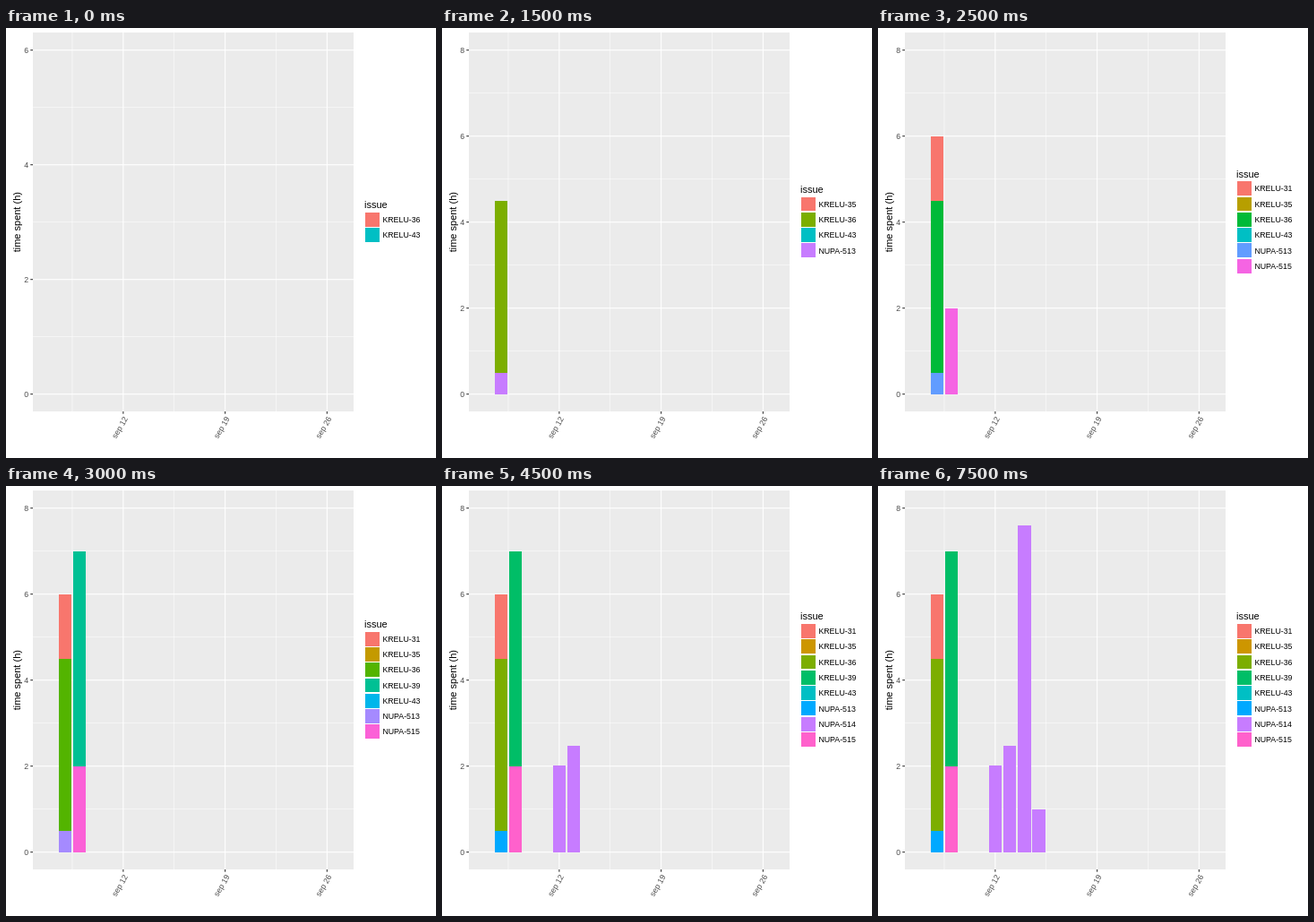
An HTML page with a canvas that plays this animation: 480 by 480 pixels, repeating every 8 s.

```html
<!DOCTYPE html>
<html lang="en">
<head>
<meta charset="utf-8">
<title>Time spent per issue</title>
<style>
html, body { margin: 0; width: 100%; height: 100%; overflow: hidden; background: #fff; }
canvas { display: block; }
</style>
</head>
<body>
<canvas id="chart" width="480" height="480"></canvas>
<script>
const ctx = document.getElementById('chart').getContext('2d');
const FONT = '"Liberation Sans", Arial, sans-serif';
const STEP = 500, STEPS = 16;

const panel = { left: 30, right: 388, top: 5, bottom: 428 };
const zeroY = 408.68, topY = 24.68;
const dayWidth = 16.25, firstDayX = 65.85;
const dayX = day => firstDayX + day * dayWidth;

// Issue name and the step at which it joins the legend
const issues = [
  ['KRELU-31', 4], ['KRELU-35', 1], ['KRELU-36', 0], ['KRELU-39', 6],
  ['KRELU-43', 0], ['NUPA-513', 2], ['NUPA-514', 7], ['NUPA-515', 5]
];

// Step, day, issue index, hours at the bottom, hours at the top
const logs = [
  [2, 0, 5, 0, 0.5], [3, 0, 2, 0.5, 4.5], [4, 0, 0, 4.5, 6],
  [5, 1, 7, 0, 2], [6, 1, 3, 2, 7],
  [7, 4, 6, 0, 0.58], [8, 4, 6, 0, 2.02], [9, 5, 6, 0, 2.47],
  [10, 6, 6, 0, 2.99], [11, 6, 6, 0, 4.41], [12, 6, 6, 0, 6.24],
  [13, 6, 6, 0, 7], [14, 6, 6, 0, 7.6], [15, 7, 6, 0, 1]
];

// Evenly spaced hues for each legend size
const palettes = {
  2: 'F8766D 00BFC4',
  3: 'F8766D 00BA38 619CFF',
  4: 'F8766D 7CAE00 00BFC4 C77CFF',
  5: 'F8766D A3A500 00BF7D 00B0F6 E76BF3',
  6: 'F8766D B79F00 00BA38 00BFC4 619CFF F564E3',
  7: 'F8766D C49A00 53B400 00C094 00B6EB A58AFF FB61D7',
  8: 'F8766D CD9600 7CAE00 00BE67 00BFC4 00A9FF C77CFF FF61CC'
};

function box(x1, y1, x2, y2, color) {
  ctx.fillStyle = color;
  ctx.fillRect(x1, y1, x2 - x1, y2 - y1);
}

function crispBox(x1, y1, x2, y2, color) {
  box(...[x1, y1, x2, y2].map(Math.round), color);
}

function hLine(y, x1, x2, width, color) {
  box(x1, y - width / 2, x2, y + width / 2, color);
}

function vLine(x, y1, y2, width, color) {
  box(x - width / 2, y1, x + width / 2, y2, color);
}

function label(text, x, y, size, color, align = 'left', angle = 0) {
  ctx.save();
  ctx.translate(x, y);
  ctx.rotate(angle * Math.PI / 180);
  ctx.font = `${size}px ${FONT}`;
  ctx.textAlign = align;
  ctx.fillStyle = color;
  ctx.fillText(text, 0, 0);
  ctx.restore();
}

function drawAxes(max, hourY) {
  const { left, right, top, bottom } = panel;
  box(left, top, right, bottom, '#EBEBEB');
  for (let h = 1; h < max; h += 2) hLine(hourY(h), left, right, 0.53, '#fff');
  for (let week = 0; week < 3; week++) vLine(dayX(0.5 + 7 * week), top, bottom, 0.53, '#fff');

  for (let h = 0; h <= max; h += 2) {
    const y = hourY(h);
    hLine(y, left, right, 1.07, '#fff');
    hLine(y, left - 2.74, left, 1.07, '#333');
    label(h, 25.06, Math.round(y + 3.15), 8.8, '#4D4D4D', 'right');
  }
  for (let week = 0; week < 3; week++) {
    const x = dayX(4 + 7 * week);
    vLine(x, top, bottom, 1.07, '#fff');
    vLine(x, bottom, bottom + 2.74, 1.07, '#333');
    label(`sep ${12 + 7 * week}`, x + 5.46, 436, 8.8, '#4D4D4D', 'right', -60);
  }
  label('time spent (h)', 16, 216.7, 11, '#000', 'center', -90);
}

function drawLegend(shown, colors) {
  const key = 17.28, left = 400.2, inset = 0.71;
  const top = 222.43 - shown.length * key / 2;
  label('issue', 400, Math.round(top - 3.85), 11, '#000');
  shown.forEach(([name], i) => {
    const y = top + i * key;
    crispBox(left + inset, y + inset, left + key - inset, y + key - inset, colors[i]);
    label(name, 420.4, Math.round(y + key / 2 + 3.15), 8.8, '#000');
  });
}

function draw(step) {
  const max = step ? 8 : 6;
  const hourY = h => zeroY - h * (zeroY - topY) / max;
  const shown = issues.filter(([, from]) => from <= step);
  const colors = palettes[shown.length].split(' ').map(c => '#' + c);

  box(0, 0, 480, 480, '#fff');
  drawAxes(max, hourY);
  for (const [from, day, issue, low, high] of logs) {
    if (from > step) break;
    const x = dayX(day), half = dayWidth * 0.45;
    crispBox(x - half, hourY(high), x + half, hourY(low), colors[shown.indexOf(issues[issue])]);
  }
  drawLegend(shown, colors);
}

let current = -1;
function tick() {
  const step = Math.floor(performance.now() / STEP) % STEPS;
  if (step !== current) draw(current = step);
  requestAnimationFrame(tick);
}
tick();
</script>
</body>
</html>
```
